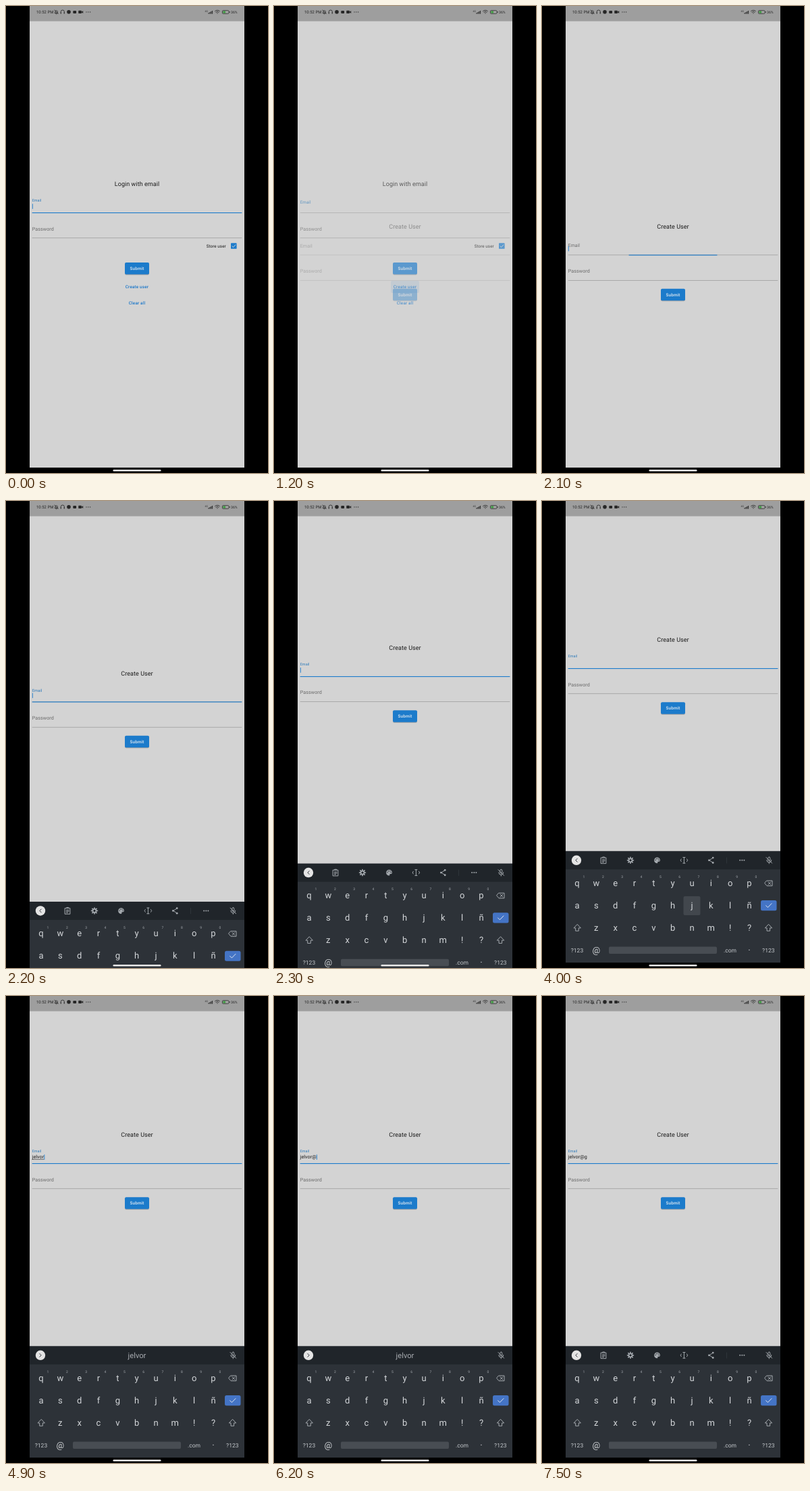
Write an HTML page that moves like this. It is 388x690 px and loops after 8 s.

```html
<!DOCTYPE html>
<html lang="en">
<head>
<meta charset="utf-8">
<title>Login and create user</title>
<style>
  html, body { margin: 0; width: 100%; height: 100%; overflow: hidden; background: #000; }
  svg { display: block; width: 388px; height: 690px; }
  text { font-family: Roboto, sans-serif; text-rendering: geometricPrecision; white-space: pre; }
  .mid { text-anchor: middle; }
  .title { font-size: 9px; letter-spacing: .06px; fill: #1c1c1c; }
  .label { font-size: 7.2px; letter-spacing: .06px; fill: #6a6a6a; }
  .input { font-size: 7.2px; letter-spacing: .04px; fill: #1c1c1c; }
  .button { font-size: 6.3px; font-weight: 500; letter-spacing: .17px; }
  .link { fill: #1976c9; }
  .key { font-size: 13px; fill: #d3d6d9; }
  .small { font-size: 8.5px; fill: #c3c7cb; }
  .digit { font-size: 5px; fill: #a4a9ae; }
  .icon { fill: none; stroke: #a3a8ad; stroke-width: 1; stroke-linecap: round; stroke-linejoin: round; }
  .status { fill: none; stroke: #303030; stroke-width: .9; stroke-linecap: round; }
</style>
</head>
<body>
<svg id="stage" viewBox="0 0 388 690"></svg>
<script>
const BLUE = '#1c7bcb', PAGE = '#d3d3d3', LOOP = 8000;
const KEY_STEP = 28.33, ROW_Y = [47, 80, 113, 146], KEYBOARD_H = 172.5;

const text = (x, y, cls, str, more = '') => `<text x="${x}" y="${y}" class="${cls}" ${more}>${str}</text>`;
const rect = (x, y, w, h, fill, more = '') =>
  `<rect x="${x}" y="${y}" width="${w}" height="${h}" fill="${fill}" ${more}/>`;
const path = (d, cls, more = '') => `<path d="${d}" class="${cls}" ${more}/>`;
const circle = (x, y, r, fill) => `<circle cx="${x}" cy="${y}" r="${r}" fill="${fill}"/>`;
const keyX = i => 52 + i * KEY_STEP;

// Form coordinates are relative to the middle of its title.
function form(id, title, submitY, extra = '') {
  return `<g id="${id}">
    ${text(194, 3.2, 'title mid', title)}
    <text class="label" data-part="label">Email</text>
    ${rect(38.7, 42.1, 310.6, .6, '#8c8c8c')}
    ${rect(38.7, 42, 310.6, 1.1, BLUE, 'data-part="line"')}
    ${text(38.7, 35.1, 'input', '', 'data-part="value"')}
    ${rect(38.7, 36, 0, .6, '#333', 'data-part="compose"')}
    ${rect(38.9, 29.3, .9, 7.5, BLUE, 'data-part="caret"')}
    ${text(38.7, 68.5, 'label', 'Password')}
    ${rect(38.7, 79.5, 310.6, .6, '#8c8c8c')}
    ${rect(176, submitY + .9, 36, 17.6, '#000', 'rx="2" opacity=".22"')}
    ${rect(176, submitY, 36, 17.5, BLUE, 'rx="2"')}
    ${text(194.1, submitY + 11, 'button mid', 'Submit', 'fill="#e4ebf2"')}
    ${extra}</g>`;
}

const loginExtra = `
  ${text(296.8, 93.7, 'input', 'Store user', 'style="font-size:6.3px"')}
  ${rect(333, 87.2, 8.6, 8.6, BLUE, 'rx=".9"')}
  ${path('M334.7 91.6l1.8 1.8 3.6-3.8', '', `fill="none" stroke="${PAGE}" stroke-width="1"`)}
  ${rect(173, 143, 42, 18, BLUE, 'rx="2" id="ripple"')}
  ${text(194, 154.3, 'button link mid', 'Create user')}
  ${text(194, 177.8, 'button link mid', 'Clear all')}`;

function statusBar() {
  const bars = [0, 1, 2, 3].map(i => rect(299.5 + i * 1.8, 10 - i, 1.2, 1.6 + i, '#303030')).join('');
  return rect(35, 0, 318, 22.5, '#9e9e9e') +
    text(45, 11, '', '10:52 PM', 'font-size="6" fill="#262626"') +
    path('M72.3 10.5h4.6l-.7-1.2V8a1.7 1.7 0 0 0-3.3 0v1.3zM72 6l5 5.5M74 11.8h1', 'status') +
    path('M81.2 10.8V8.6a2.6 2.6 0 0 1 5.2 0v2.2M81.4 9.5v1.6M86.2 9.5v1.6', 'status') +
    circle(93, 8.8, 2.8, '#262626') + rect(99.3, 7, 4.8, 4, '#262626', 'rx="1"') +
    rect(107.3, 6.8, 4.6, 4.2, '#262626', 'rx=".6"') + path('M111.6 8.9l2.6-2v4z', '', 'fill="#262626"') +
    [119, 121.8, 124.6].map(x => circle(x, 8.9, .7, '#303030')).join('') +
    text(294.5, 8.5, '', '4G', 'font-size="3.6" fill="#303030"') + bars +
    path('M309.5 7.6a5 5 0 0 1 7 0M310.9 9.2a3 3 0 0 1 4.2 0M312.7 10.8h.6', 'status') +
    rect(320.4, 6.6, 9.6, 4.8, 'none', 'rx="1.2" stroke="#303030" stroke-width=".8"') +
    rect(321.3, 7.5, 3.8, 3, '#3f9a42', 'rx=".4"') + rect(330.7, 8, .9, 2, '#303030') +
    text(333, 11, '', '36%', 'font-size="5.2" fill="#262626"');
}

function toolbarIcons() {
  const teeth = Array.from({ length: 8 }, (_, i) =>
    `<path d="M0 -3.2V-4.4" transform="translate(131 13.3) rotate(${i * 45})" stroke-width="1.7"/>`).join('');
  return `<g class="icon">
    <path d="M87.5 9.5h7.4v8.6h-7.4zM89.7 9.5v-1h3v1M89.3 12.3h3.8M89.3 14.2h3.8M89.3 16h2.2"/>
    ${teeth}<circle cx="131" cy="13.3" r="2.5" stroke-width="1.7"/>
    <path d="M206.3 11.5l-1.2 1.8 1.2 1.8M214.5 11.5l1.2 1.8-1.2 1.8M208.8 9h3.2M208.8 17.6h3.2M210.4 9v8.6"/>
    <path d="M253 9.8l-5.2 3.5 5.2 3.5"/></g>` +
    path('M170.5 9a4.4 4.4 0 1 0 0 8.8c1.5 0 .4-1.5 1-2.2.6-.8 3.4.4 3.4-2.4 0-2.4-1.9-4.2-4.4-4.2z', '', 'fill="#a3a8ad"') +
    [[168, 13], [169.4, 11], [171.8, 11], [173.2, 13]].map(([x, y]) => circle(x, y, .7, '#20252a')).join('') +
    [[253.2, 9.6], [247.4, 13.3], [253.2, 17]].map(([x, y]) => circle(x, y, 1.4, '#a3a8ad')).join('') +
    rect(273, 9, .6, 9, '#3a4046') +
    [293.2, 296.3, 299.4].map(x => circle(x, 13.3, 1, '#a3a8ad')).join('');
}

function keyboard() {
  const row = (chars, y, from = 0) =>
    [...chars].map((c, i) => text(keyX(from + i).toFixed(1), y + 4, 'key mid', c)).join('');
  const digits = [...'1234567890'].map((d, i) => text((keyX(i) + 10).toFixed(1), 39.5, 'digit mid', d)).join('');
  const shift = x => path(`M${x} 108.2l-5 5.2h2.7v4.3h4.6v-4.3h2.7z`, 'icon');
  return `<g id="keyboard">
    ${rect(35, 0, 318, 165, '#2d3238')}${rect(35, 0, 318, 26.8, '#20252a')}
    ${rect(35, 164.5, 318, 9, '#000')}
    ${rect(0, 0, 25, 28, '#42474d', 'rx="2" id="pressed"')}
    <g id="tools">${toolbarIcons()}</g>
    ${text(194, 17.3, 'mid', '', 'id="suggestion" font-size="11.2" fill="#a9adb2"')}
    ${circle(51, 13.3, 7.2, '#e4e4e4')}
    ${path('M1.2-2.4l-2.4 2.4 2.4 2.4', 'icon', 'id="chevron" style="stroke:#33383d"')}
    <g class="icon"><rect x="334.8" y="8.6" width="3" height="5.6" rx="1.5"/>
      <path d="M332.8 13a3.5 3.5 0 0 0 7 0M336.3 16.5v1.8M332 9l8.6 8.6"/></g>
    ${digits}${row('qwertyuiop', ROW_Y[0])}${row('asdfghjklñ', ROW_Y[1])}${row('zxcvbnm!?', ROW_Y[2], 1)}
    ${path('M333 43.5h8v7.6h-8l-3.2-3.8zM335 45.4l3.8 3.8M338.8 45.4l-3.8 3.8', 'icon')}
    ${rect(324, 72.5, 23.5, 15.2, '#4474c5', 'rx="2.5"')}
    ${path('M331.6 80.2l2.8 2.8 5.6-5.8', 'icon', 'style="stroke:#dce4f0"')}
    ${shift(52)}${shift(335.3)}
    ${text(52, 149, 'small mid', '?123')}${text(80.3, 150, 'key mid', '@')}
    ${rect(99, 141, 160, 10.5, '#484d53', 'rx="2"')}
    ${text(278.5, 149, 'small mid', '.com')}${text(307, 150, 'key mid', '·')}${text(335.3, 149, 'small mid', '?123')}
  </g>`;
}

const stage = document.getElementById('stage');
stage.innerHTML = rect(0, 0, 388, 690, '#000') + rect(35, 22, 318, 660, PAGE) + statusBar() +
  form('login', 'Login with email', 116, loginExtra) + form('create', 'Create User', 92.3) +
  keyboard() + rect(158.5, 685, 71, 2.4, '#e8e8e8', 'rx="1.2"');

const $ = id => document.getElementById(id);
const set = (node, attrs) => Object.entries(attrs).forEach(([k, v]) => node.setAttribute(k, v));
const show = (node, on) => node.setAttribute('visibility', on ? 'visible' : 'hidden');
const clamp = v => Math.min(1, Math.max(0, v));
const span = (t, from, to) => clamp((t - from) / (to - from));
const easeOut = p => 1 - (1 - p) ** 3;

// Time, typed text, pressed key.
const TYPING = [
  [0, '', ''], [4000, '', 'j'], [4100, 'j', ''], [4200, 'je', 'e'], [4300, 'jel', 'l'], [4400, 'jel', ''],
  [4500, 'jelv', 'v'], [4600, 'jelv', ''], [4700, 'jelvo', ''], [4900, 'jelvor', ''],
  [6200, 'jelvor@', ''], [6900, 'jelvor@', 'g'], [7000, 'jelvor@g', '']
];
const KEY_ROWS = ['qwertyuiop', 'asdfghjklñ', ' zxcvbnm!?'];
const CARET_ON = [[0, 600], [2100, 2600], [3100, 3600], [4100, 5400], [5900, 6700], [7000, 7500]];

function drawForm(id, { middle, opacity, focus, line, value = '', composing = false, caret }) {
  const group = $(id), part = name => group.querySelector(`[data-part=${name}]`);
  set(group, { transform: `translate(0 ${middle})`, opacity });
  show(group, opacity > 0);
  if (!opacity) return;
  const scale = 1 - .25 * focus;
  set(part('label'), { transform: `translate(38.7 ${31.1 - 5.2 * focus}) scale(${scale})` });
  part('label').style.fill = focus > .3 ? '#2b79b9' : '#6a6a6a';
  set(part('line'), { transform: `translate(194 0) scale(${line} 1) translate(-194 0)` });
  part('value').textContent = value;
  const width = value ? part('value').getComputedTextLength() : 0;
  set(part('compose'), { width: composing ? width : 0 });
  set(part('caret'), { x: 38.9 + width });
  part('caret').style.opacity = caret ? 1 : 0;
}

function render(time) {
  const t = Math.floor(time / 100) * 100;
  const fade = t < 1100 ? 0 : span(t, 1080, 1400);
  const [, value, pressed] = TYPING.filter(step => step[0] <= t).pop();
  const composing = t >= 4100 && t < 6200;
  const suggesting = t >= 4100 && t < 6300;
  const caret = CARET_ON.some(([from, to]) => t >= from && t < to);

  drawForm('login', {
    middle: 263, opacity: 1 - fade * .92 * (fade < 1) - (fade === 1),
    focus: 1 - span(t, 1080, 1320), line: t < 1200 ? 1 : 0, caret
  });
  $('ripple').style.opacity = t >= 1100 ? .12 : 0;

  const rise = easeOut(span(t, 2114, 2467));
  drawForm('create', {
    middle: 325.5 - 120.5 * rise ** .93, opacity: fade,
    focus: easeOut(span(t, 2080, 2400)), line: easeOut(span(t, 2080, 2200)),
    value, composing, caret: caret && t >= 2100
  });

  set($('keyboard'), { transform: `translate(0 ${690 - KEYBOARD_H * rise})` });
  show($('keyboard'), rise > 0);
  $('tools').style.opacity = suggesting ? 0 : 1;
  $('suggestion').textContent = suggesting ? value.replace('@', '') : '';
  set($('chevron'), { transform: `translate(51 13.3) scale(${suggesting ? -1 : 1} 1)` });

  const row = pressed ? KEY_ROWS.findIndex(keys => keys.includes(pressed)) : -1;
  $('pressed').style.opacity = row < 0 ? 0 : 1;
  if (row >= 0) set($('pressed'), { x: keyX(KEY_ROWS[row].indexOf(pressed)) - 12.5, y: ROW_Y[row] - 13.5 });
}

const start = performance.now();
function tick() {
  render((performance.now() - start) % LOOP);
  requestAnimationFrame(tick);
}
tick();
</script>
</body>
</html>
```
